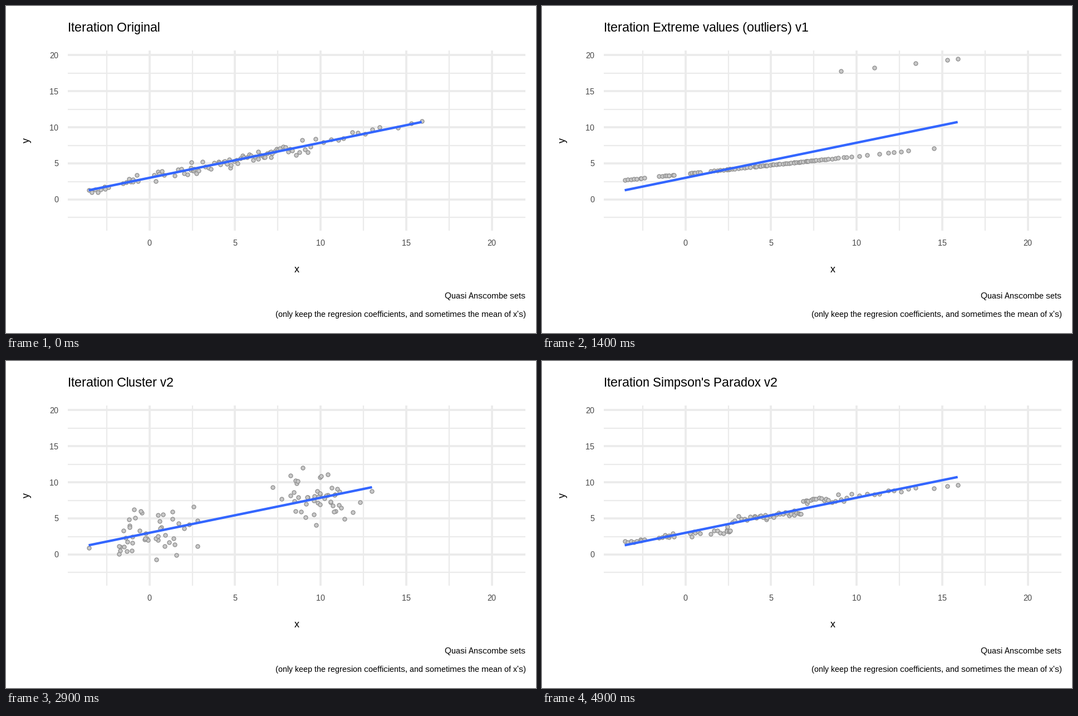
A matplotlib script that plays this animation: 952x588 px, repeating every 5 s.

```python
import numpy as np
import matplotlib
import matplotlib.pyplot as plt
from matplotlib.animation import FuncAnimation

W, H, DPI = 952, 588, 100
PT = 72 / DPI                      # points per pixel
FRAMES, INTERVAL = 50, 100
B0, B1 = 3.01, 0.486               # shared regression coefficients
N = 99

matplotlib.rcParams.update({
    "font.family": "Liberation Sans",
    "text.hinting": "native",      # whole-pixel letter spacing
    "text.hinting_factor": 1,
})
rng = np.random.default_rng(12)


def to_px(x, y):
    return np.column_stack([257.7 + 30.75 * np.asarray(x),
                            348.0 - 12.98 * np.asarray(y)])


def sample_x():
    """Sorted values following a few key ranks, slightly jittered."""
    rank = [0, 7, 8, 15, 16, 21, 22, 27, 32, 40,
            54, 65, 74, 85, 88, 95, 96, 98]
    value = [-3.55, -2.38, -1.47, -.63, .19, .83, 1.49, 2.43, 2.61, 3.94,
             5.52, 6.83, 7.6, 9.37, 10.6, 13.4, 14.6, 15.9]
    x = np.interp(np.arange(N), rank, value)
    x[1:-1] += rng.normal(0, .05, N - 2)
    return np.sort(x)


X = sample_x()
U = np.arange(1, N + 1) / N
LINE = B0 + B1 * X
LIMIT = np.minimum(.5 + 1.6 * U, 1.1)
RESID = np.clip(rng.normal(0, .43, N), -LIMIT, LIMIT)
LEVEL = np.repeat([2.42, 5.4, 8.37], N // 3)   # one level per group


def wave(x):
    amp = np.minimum(1.5 + .1 * np.abs(x - 5), 2.1)
    return amp * np.cos(.98 * (x - .05)) + .03 * (6 - x)


def outliers(rows):
    """Half the slope, with some rows lifted to restore the regression."""
    dx = X - X.mean()
    y = B1 / 2 * X + .01 * RESID
    y[rows] += B1 / 2 * np.sum(dx ** 2) / np.sum(dx[rows])
    return X, y + LINE.mean() - y.mean()


def clusters(centres, sizes, sx, sy, lo, hi):
    """Clouds around the line, spanning lo..hi, with the same regression."""
    x = np.repeat(centres, sizes) + sx * np.clip(rng.normal(size=N), -2, 2)
    x[np.argmin(x)], x[np.argmax(x)] = lo, hi
    e = np.clip(rng.normal(size=N), -2, 2.4)
    e -= np.polyval(np.polyfit(x, e, 1), x)
    return x, B0 + B1 * x + sy * e


STATES = [
    ("Original", (X, LINE + RESID)),
    ("No linear relationship v1", (X, LINE + np.sin(X) + .25 * RESID)),
    ("No linear relationship v2", (X, LINE + wave(X))),
    ("Extreme values (outliers) v1", outliers([83, 89, 95, 97, 98])),
    ("Extreme values (outliers) v2",
     outliers([78, 79, 82, 83, 87, 89, 90, 95, 96, 98])),
    ("Cluster v1", clusters([-.1, 19.8], [74, 25], .4, 2.2, -.9, 20.75)),
    ("Cluster v2", clusters([0, 10], [49, 50], 1.4, 1.9, X[0], 13)),
    ("Heteroskedasticity v1", (X, LINE + 1.55 * U * RESID)),
    ("Heteroskedasticity v2", (X, LINE + 9.7 * (1 - U) ** 2 * RESID)),
    ("Simpson's Paradox v1", (X, 2 * LEVEL - LINE + RESID)),
    ("Simpson's Paradox v2", (X, LEVEL + .1 * RESID)),
]
TITLES = [name for name, _ in STATES]
DOTS = [to_px(*xy) for _, xy in STATES]


def fit_ends(x):
    ends = np.array([x.min(), x.max()])
    return to_px(ends, B0 + B1 * ends)


FITS = [fit_ends(xy[0]) for _, xy in STATES]

# (first moving frame, number of steps) of each change of state
MOVES = [(2 + 5 * k, 3) for k in range(7)] + [(37 + 4 * k, 2) for k in range(4)]


def locate(frame):
    """State index and progress towards the next state."""
    state = 0
    for k, (start, steps) in enumerate(MOVES):
        done = frame - start + 1
        if done <= 0:
            break
        if done < steps:
            return k, done / steps
        state = k + 1
    return state % len(STATES), 0.0


fig = plt.figure(figsize=(W / DPI, H / DPI), dpi=DPI, facecolor="white")
ax = fig.add_axes([0, 0, 1, 1])
ax.set(xlim=(0, W), ylim=(H, 0))
ax.axis("off")


def label(x, y, text, size, color="black", **kw):
    return ax.text(x, y, text, fontsize=size * PT, color=color, **kw)


def grid(values, width):
    """One vertical and one horizontal line for each value."""
    for v in values:
        x, y = to_px([v], [v])[0]
        for xs, ys in [((x, x), (80, 404)), ((111, 933), (y, y))]:
            ax.plot(xs, ys, color="#EBEBEB", lw=width * PT,
                    solid_capstyle="butt", zorder=1)


grid(np.arange(-2.5, 20, 5), 2.2)
grid(range(0, 21, 5), 3.8)

for v in range(0, 21, 5):
    tx, ty = to_px([v], [v])[0]
    label(tx, 431, str(v), 15, "#4D4D4D", ha="center")
    label(94, ty + 5.3, str(v), 15, "#4D4D4D", ha="right")

label(522, 479, "x", 19, ha="center")
label(36.5, 241.5, "y", 19, ha="center", va="center", rotation=90)
label(933, 526, "Quasi Anscombe sets", 15, ha="right")
label(934, 559, "(only keep the regresion coefficients, "
      "and sometimes the mean of x's)", 15, ha="right")
title = label(111, 46, "", 23)

dots = ax.scatter(*DOTS[0].T, s=(7 * PT) ** 2, facecolor="#C8C8C8",
                  edgecolor="#919191", linewidth=1.35 * PT, zorder=2)
fit, = ax.plot([], [], color="#3366FF", lw=4.3 * PT,
               solid_capstyle="butt", zorder=3)


def draw(frame):
    a, t = locate(frame)
    b = (a + 1) % len(STATES)
    title.set_text("Iteration " + TITLES[b if t > .5 else a])
    dots.set_offsets((1 - t) * DOTS[a] + t * DOTS[b])
    fit.set_data(*((1 - t) * FITS[a] + t * FITS[b]).T)
    return title, dots, fit


anim = FuncAnimation(fig, draw, frames=FRAMES, interval=INTERVAL,
                     repeat=True, repeat_delay=0)
plt.show()
```
